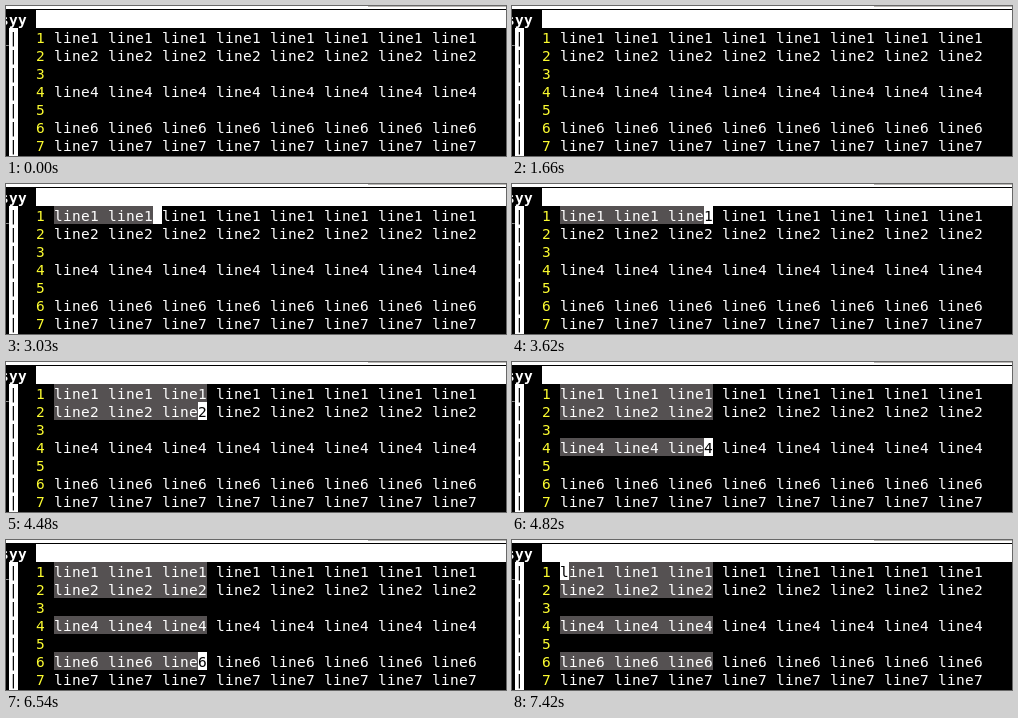
An HTML page with a canvas for the animation above (8000 ms loop, 500 px wide and 150 px high).

```html
<!DOCTYPE html>
<html lang="en">
<head>
<meta charset="utf-8">
<title>Block selection</title>
<style>
html, body { margin: 0; width: 100%; height: 100%; overflow: hidden; background: #000; }
canvas { display: block; }
</style>
</head>
<body>
<canvas id="stage" width="500" height="150"></canvas>
<script>
const ctx = document.getElementById("stage").getContext("2d");
const LOOP = 8000, CELL_W = 9, CELL_H = 18, LEFT = 48, TOP = 22, BASELINE = 15;
const BLINK_DELAY = 570, BLINK_HALF = 600;
const WHITE = "#fff", BLACK = "#000", GREY = "#555152", YELLOW = "#fcfc30";
const FONT = '14.5px "DejaVu Sans Mono", monospace';

const lines = Array.from({ length: 7 }, (_, i) =>
  i === 2 || i === 4 ? "" : Array(8).fill("line" + (i + 1)).join(" "));

// Runs of evenly spaced key presses: v = mode key, l = right, j = down, o = other corner.
const runs = [
  { key: "v", from: 340, every: 375, count: 3 },
  { key: "l", from: 1730, every: 170, count: 5 },
  { key: "l", from: 2870, every: 30, count: 9 },
  { key: "l", from: 3390, every: 230, count: 2 },
  { key: "j", from: 4480, every: 170, count: 4 },
  { key: "j", from: 5370, every: 170, count: 1 },
  { key: "o", from: 6860, every: 170, count: 1 }
];

function stateAt(t) {
  const presses = { v: 0, l: 0, j: 0, o: 0 };
  let lastPress = -BLINK_DELAY;
  for (const { key, from, every, count } of runs) {
    if (t < from) break;
    const done = Math.min(count, 1 + Math.floor((t - from) / every));
    presses[key] += done;
    lastPress = from + (done - 1) * every;
  }
  const row = presses.j;
  const col = Math.min(presses.l, Math.max(0, lines[row].length - 1));
  const blinks = Math.floor((t - lastPress - BLINK_DELAY) / BLINK_HALF);
  return {
    end: { row, col },
    cursor: presses.o ? { row: 0, col: 0 } : { row, col },
    visible: blinks < 0 || blinks % 2 === 1
  };
}

function rect(x, y, w, h, color) {
  ctx.fillStyle = color;
  ctx.fillRect(x, y, w, h);
}

function type(text, x, top, color, bold = false) {
  ctx.font = (bold ? "bold " : "") + FONT;
  ctx.fillStyle = color;
  [...text].forEach((ch, i) => ctx.fillText(ch, x + i * CELL_W, top + BASELINE));
}

function drawWindow() {
  rect(0, 0, 500, 150, BLACK);
  rect(0, 0, 500, 3, WHITE);
  rect(362, 0, 138, 1, "#b8b6b3");
  rect(30, 4, 470, CELL_H, WHITE);
  type("syy", -6, 4, WHITE, true);
  type("_", -6, TOP - 1, WHITE);
  rect(3, TOP, CELL_W, 128, WHITE);
  for (let row = 0; row < 8; row++) type("|", 3, TOP + row * CELL_H, BLACK);
}

function draw(t) {
  const { end, cursor, visible } = stateAt(t);
  drawWindow();
  lines.forEach((line, row) => {
    const y = TOP + row * CELL_H;
    if (line && row <= end.row) rect(LEFT, y, (end.col + 1) * CELL_W, CELL_H, GREY);
    type(String(row + 1), 30, y, YELLOW);
    type(line, LEFT, y, WHITE);
  });
  const x = LEFT + cursor.col * CELL_W, y = TOP + cursor.row * CELL_H;
  rect(x, y, CELL_W, CELL_H, visible ? WHITE : BLACK);
  type(lines[cursor.row][cursor.col] || "", x, y, visible ? BLACK : WHITE);
}

function tick() {
  draw(performance.now() % LOOP);
  requestAnimationFrame(tick);
}
tick();
</script>
</body>
</html>
```
